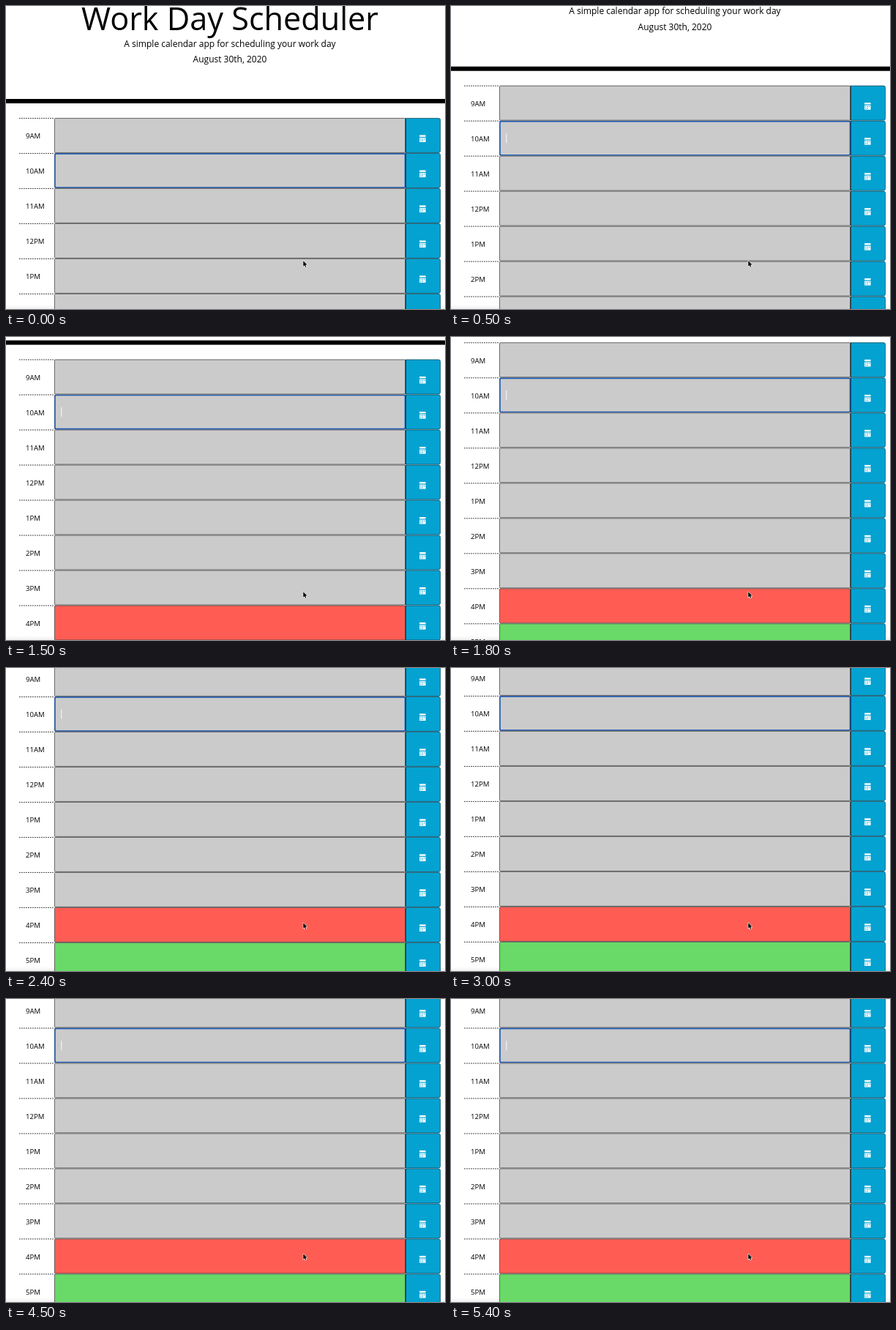
Write an HTML page with a canvas that moves like this. It is 600x414 px and loops after 5.5 s.

```html
<!DOCTYPE html>
<html lang="en">
<head>
<meta charset="utf-8">
<title>Work Day Scheduler</title>
<style>
  html, body { margin: 0; width: 100%; height: 100%; overflow: hidden; background: #fff; }
  canvas { display: block; width: 600px; height: 414px; }
</style>
</head>
<body>
<canvas id="stage" width="600" height="414"></canvas>
<script>
const ctx = document.getElementById('stage').getContext('2d');
const LOOP = 5500, STEP = 100, ROW = 48, TOP = 153;
const HOURS = ['9AM', '10AM', '11AM', '12PM', '1PM', '2PM', '3PM', '4PM', '5PM'];
const PAST = '#cbcbcb', NOW = '#ff5d53', NEXT = '#69d968', BLUE = '#04a2d1';
const FONT = '"Open Sans", "Noto Sans", sans-serif';

// [time, scroll offset] pairs
const SCROLL = [[0, 0], [500, 44.3], [900, 73], [1500, 122.4], [2000, 161],
  [2400, 162], [3000, 163], [3700, 163], [4300, 161.5], [LOOP, 161.5]];

function scrollAt(t) {
  const i = SCROLL.findIndex(([time]) => time > t);
  const [t0, y0] = SCROLL[i - 1], [t1, y1] = SCROLL[i];
  return y0 + (y1 - y0) * (t - t0) / (t1 - t0);
}

function rect(x, y, w, h, color) {
  ctx.fillStyle = color;
  ctx.fillRect(x, y, w, h);
}

function text(str, x, y, size, align) {
  ctx.font = `${size}px ${FONT}`;
  ctx.textAlign = align;
  ctx.fillStyle = '#000';
  ctx.fillText(str, x, y);
}

function box(x, y, w, h, radii, fill, stroke, width) {
  ctx.beginPath();
  ctx.roundRect(x, y, w, h, radii);
  if (fill) { ctx.fillStyle = fill; ctx.fill(); }
  ctx.strokeStyle = stroke;
  ctx.lineWidth = width;
  ctx.stroke();
}

function icon(x, y) {
  const u = 1.2;
  rect(x, y, 7 * u, 2 * u, '#fff');
  rect(x, y + 3 * u, 7 * u, 5 * u, '#fff');
  for (const [cx, cy] of [[1, 4], [3, 4], [5, 4], [1, 6], [3, 6]])
    rect(x + cx * u, y + cy * u, u, u, BLUE);
}

function row(label, i) {
  const y = TOP + i * ROW;
  ctx.setLineDash([1.8, 1.2]);
  ctx.lineWidth = 0.8;
  ctx.strokeStyle = '#000';
  ctx.beginPath();
  ctx.moveTo(18, y + 0.4);
  ctx.lineTo(66, y + 0.4);
  ctx.stroke();
  ctx.setLineDash([]);
  text(label, 27, y + 28.2, 9.6, 'left');
  const fill = i < 7 ? PAST : i === 7 ? NOW : NEXT;
  box(66.4, y + 0.4, 479.4, 47, 1, fill, '#444', 0.8);
  box(546.3, y + 0.4, 47.3, 47, [0, 2.4, 2.4, 0], BLUE, '#0b4a60', 0.8);
  rect(545.8, y + 0.4, 0.8, 47, '#111');
  icon(565.2, y + 23.4);
}

function pointer(x, y) {
  ctx.beginPath();
  for (const [px, py] of [[0, 0], [0, 7.4], [1.7, 5.9], [2.8, 8.5], [4, 8], [2.9, 5.4], [5.2, 5.3]])
    ctx.lineTo(x + px, y + py);
  ctx.closePath();
  ctx.lineWidth = 1.2;
  ctx.lineJoin = 'round';
  ctx.strokeStyle = '#fff';
  ctx.stroke();
  ctx.fillStyle = '#000';
  ctx.fill();
}

function draw(t) {
  rect(0, 0, 600, 414, '#fff');
  const shade = ctx.createLinearGradient(0, 408, 0, 414);
  shade.addColorStop(0, '#fff');
  shade.addColorStop(1, '#f0f0f0');
  rect(0, 408, 600, 6, shade);

  ctx.save();
  ctx.translate(0, -scrollAt(t));
  text('Work Day Scheduler', 306, 32.5, 43.2, 'center');
  text('A simple calendar app for scheduling your work day', 306, 55.6, 12, 'center');
  text('August 30th, 2020', 306, 77.2, 12, 'center');
  rect(0, 127, 600, 6, '#000');
  HOURS.forEach(row);
  const y = TOP + ROW;
  box(67, y + 1, 478.4, 45.9, 1.5, null, '#1a58b8', 1.4);
  if (t % 1000 >= 400 && t % 1000 < 900) rect(75.3, y + 17.5, 0.9, 13, '#fff');
  ctx.restore();
  pointer(406.3, 348.3);
}

function frame(now) {
  draw(Math.floor(now % LOOP / STEP) * STEP);
  requestAnimationFrame(frame);
}
draw(0);
requestAnimationFrame(frame);
</script>
</body>
</html>
```
